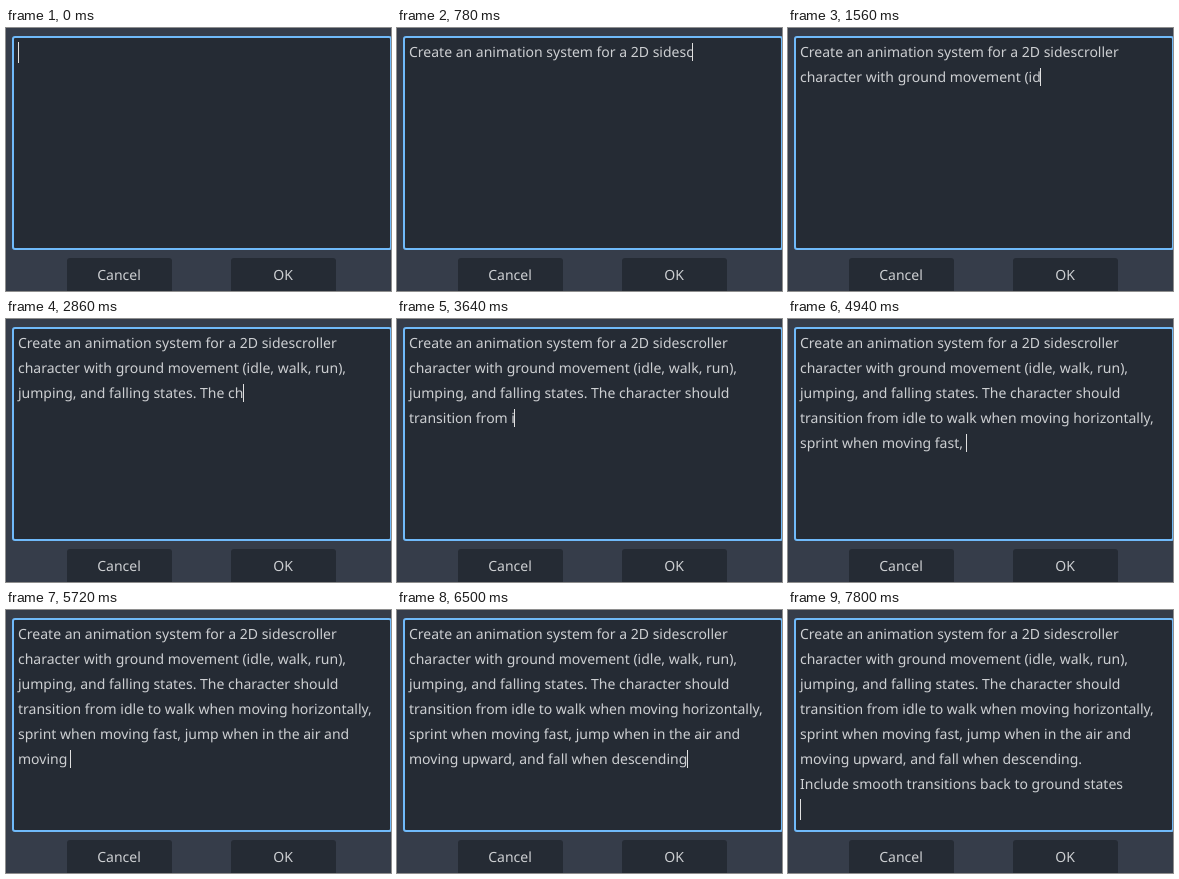
Recreate the animation shown at these times as an HTML page with a canvas. Size 385 by 263 pixels, loop 8.06 s.

```html
<!DOCTYPE html>
<html lang="en">
<head>
<meta charset="utf-8">
<style>
  html, body { margin: 0; overflow: hidden; background: #363d4a; }
  canvas { display: block; }
</style>
</head>
<body>
<canvas width="385" height="263"></canvas>
<script>
const ctx = document.querySelector('canvas').getContext('2d');
const STEP = 260, STEPS = 31;
const LEFT = 12, BASELINE = 29, LINE_HEIGHT = 25;
const PANEL = '#252b34', TEXT = '#cdcfd2', ACCENT = '#70bafa';

// Each line ends with the space or newline that moves the caret on.
const lines = [
  'Create an animation system for a 2D sidescroller ',
  'character with ground movement (idle, walk, run), ',
  'jumping, and falling states. The character should ',
  'transition from idle to walk when moving horizontally, ',
  'sprint when moving fast, jump when in the air and ',
  'moving upward, and fall when descending.\n',
  'Include smooth transitions back to ground states\n',
  ''
];

// Typing pace: [step, characters typed]
const pace = [[0, 0], [6, 83], [11, 134], [16, 187], [19, 229], [25, 293], [30, 344]];

function typedAt(step) {
  const i = Math.max(1, pace.findIndex(([s]) => s >= step));
  const [s0, n0] = pace[i - 1], [s1, n1] = pace[i];
  return Math.round(n0 + (n1 - n0) * (step - s0) / (s1 - s0));
}

function roundRect(x, y, w, h, r) {
  ctx.beginPath();
  ctx.roundRect(x, y, w, h, r);
}

function button(label, x) {
  roundRect(x, 230, 105, 40, 3);
  ctx.fillStyle = PANEL;
  ctx.fill();
  ctx.fillStyle = TEXT;
  ctx.textAlign = 'center';
  ctx.fillText(label, x + 52, 252);
}

function drawDialog() {
  ctx.fillStyle = '#363d4a';
  ctx.fillRect(0, 0, 385, 263);
  roundRect(7, 9, 378, 212, 2);
  ctx.fillStyle = PANEL;
  ctx.fill();
  ctx.strokeStyle = ACCENT;
  ctx.lineWidth = 2;
  ctx.stroke();
  button('Cancel', 61);
  button('OK', 225);
}

function drawTyping(count) {
  ctx.textAlign = 'left';
  ctx.fillStyle = TEXT;
  for (let row = 0; row < lines.length; row++) {
    const line = lines[row], y = row * LINE_HEIGHT;
    const shown = line.slice(0, count);
    ctx.fillText(shown.trimEnd(), LEFT, BASELINE + y);
    if (count < line.length || row === lines.length - 1) {
      const x = Math.floor(LEFT + ctx.measureText(shown).width);
      ctx.fillStyle = '#e0e0e0';
      if (shown) ctx.fillRect(x, y + 15, 1, 18);
      else ctx.fillRect(x, y + 14, 1, 21);
      return;
    }
    count -= line.length;
  }
}

function frame() {
  const step = Math.floor(performance.now() / STEP) % STEPS;
  ctx.font = '14px "Noto Sans", sans-serif';
  ctx.textRendering = 'geometricPrecision';
  drawDialog();
  drawTyping(typedAt(step));
  requestAnimationFrame(frame);
}
frame();
</script>
</body>
</html>
```
